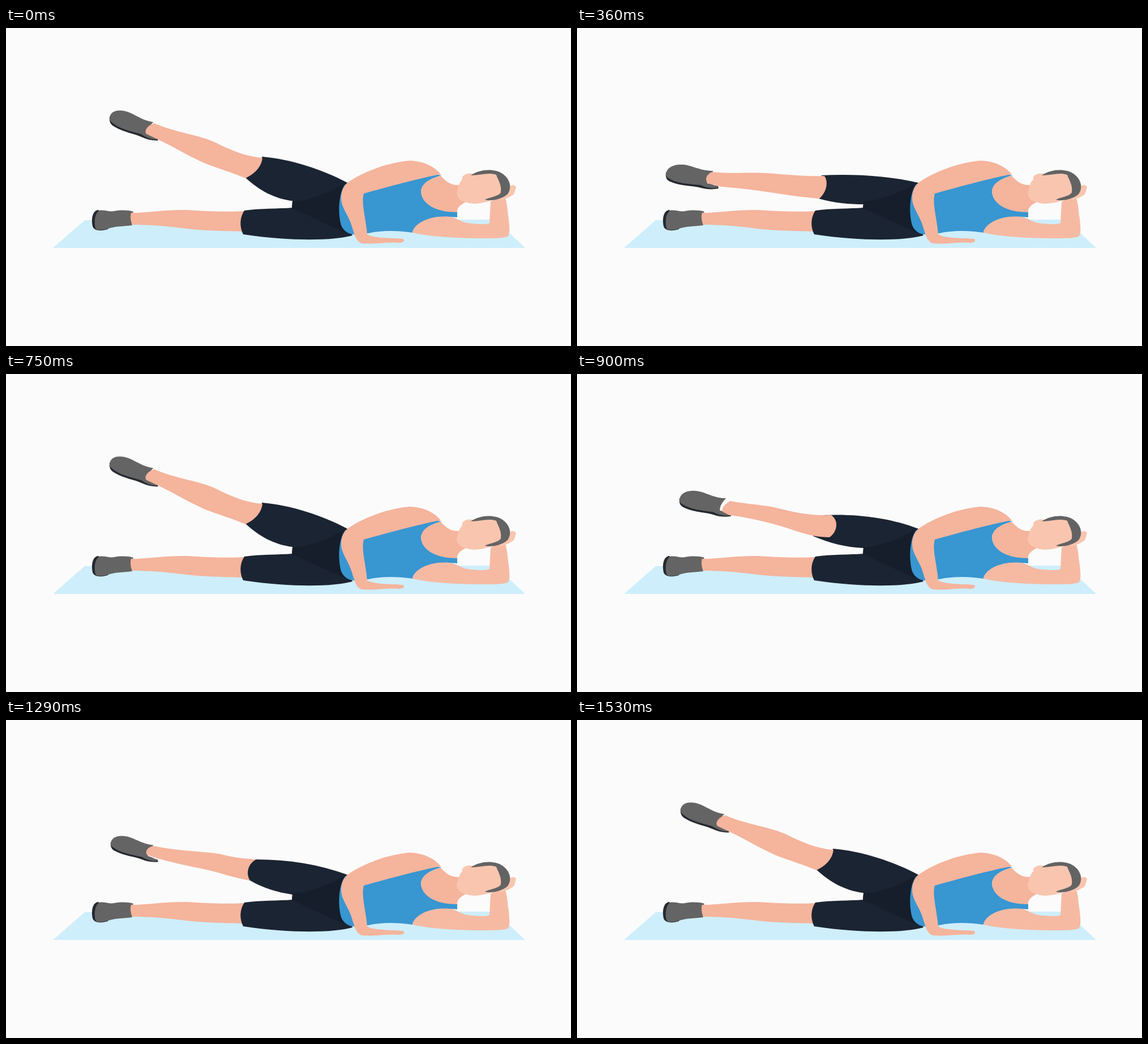
Write an HTML page with a canvas that moves like this. It is 998 by 561 pixels and loops after 1560 ms.

```html
<!DOCTYPE html>
<html lang="en">
<head>
<meta charset="utf-8">
<title>Side-lying leg raise</title>
<style>
  html, body { margin: 0; width: 100%; height: 100%; overflow: hidden; background: #fbfbfb; }
  canvas { display: block; }
</style>
</head>
<body>
<canvas id="stage" width="998" height="561"></canvas>
<script>
const ctx = document.getElementById('stage').getContext('2d');
const LOOP = 1560;

const color = {
  paper: '#fbfbfb', mat: '#ceeefb', skin: '#f5b49c', arm: '#f6baa3', face: '#f9c5af',
  shorts: '#1b2432', overlap: '#151e2a', shirt: '#3896d1', shoe: '#646464',
  sole: '#252930', hair: '#636363'
};

function fill(path, style) {
  ctx.fillStyle = style;
  ctx.fill(path);
}

const shape = d => new Path2D(d);

const mat = shape('M83 388 L139 339 L864 338 L917 388 Z');

const lowerLeg = {
  sole: shape('M163 321 C153 322 150 336 153 350 C156 359 170 358 180 355 L184 340 Z'),
  shoe: shape('M164 322 C174 320 183 325 191 323 C203 321 215 321 225 324 C220 333 221 341 223 348 C206 350 191 350 180 354 C170 357 160 358 158 353 C155 341 157 328 164 322 Z'),
  skin: shape('M221 326 C250 326 285 320 320 321 C350 323 385 325 420 323 L418 359 C380 358 340 357 310 353 C280 349 250 347 223 347 C220 340 219 332 221 326 Z'),
  shorts: shape('M421 322 C450 318 480 319 506 317 L560 308 L592 330 L612 366 C580 375 505 377 419 364 C412 350 413 334 421 322 Z')
};

const torso = {
  overlap: shape('M506 306 C538 304 568 292 595 276 C585 302 588 336 612 364 C572 352 540 332 505 318 Z'),
  shirt: shape('M599 276 C587 292 586 326 592 348 C597 360 608 366 622 364 L640 362 C670 356 692 358 718 361 C720 345 750 331 797 334 L797 324 C757 325 734 309 733 288 C735 272 752 265 769 260 L690 245 Z'),
  neck: shape('M764 256 C774 269 785 278 800 277 L812 307 C802 312 796 318 797 325 C757 325 734 309 733 288 C735 272 750 266 769 260 Z'),
  restingArm: shape('M718 361 C721 344 749 330 784 333 C800 336 802 343 822 345 C838 346 849 347 854 344 L856 306 L879 294 C886 306 885 319 888 337 C889 350 891 360 887 367 C880 372 850 371 826 371 C785 370 750 368 718 361 Z'),
  hand: shape('M876 276 L889 280 C894 275 900 277 901 281 C899 286 899 292 895 295 C888 298 884 302 873 304 Z'),
  face: shape('M823 257 C813 255 804 261 806 267 C799 274 799 283 796 290 C796 297 800 304 811 307 C824 312 839 310 855 305 L878 290 L872 256 Z'),
  hair: shape('M821 260 C836 249 862 247 877 257 C891 267 894 282 886 293 C876 302 858 306 846 303 C855 298 871 297 874 290 C876 277 869 268 866 259 C852 254 838 260 821 260 Z'),
  supportArm: shape('M603 273 C633 252 677 237 712 234 C741 235 758 246 768 258 C734 264 675 280 632 292 C627 309 636 337 638 364 C649 371 675 370 701 372 C706 375 702 379 694 379 C674 377 650 382 629 380 C617 377 615 361 609 344 C604 330 592 315 592 301 C592 289 595 280 603 273 Z')
};

// The raised shoe, drawn from its toe at the origin.
const shoe = shape('M0 1 C1 -11 14 -17 30 -16 C47 -15 59 -5 84 -5 C77 2 72 10 73 17 C80 18 88 21 92 24 C84 27 71 25 61 20 C41 18 18 17 5 8 C1 6 0 4 0 1 Z');
const shoeSole = shape('M0 -2 C-1 7 1 12 10 15 C27 22 49 21 62 25 C72 28 84 28 93 26 L92 22 L60 16 L8 2 Z');

const pose = (shoeAt, skin, shorts, hidesKnee) =>
  ({ shoeAt, skin: shape(skin), shorts: shape(shorts), hidesKnee });

const hip = 'L505 318 L590 345 C587 318 588 295 603 273 ';

const high = pose([.92, .155, 0, 1, 183, 158],
  'M262 168 C300 185 340 188 370 202 C400 217 425 227 453 229 C451 246 439 257 423 265 C400 255 375 248 352 239 C320 225 290 206 267 196 L248 187 C243 181 251 171 262 168 Z',
  'M423 264 C448 287 474 301 506 305 ' + hip + 'C560 250 503 231 452 227 C450 246 439 257 423 264 Z');

const midDown = pose([.98, .04, 0, 1, 181, 221],
  'M270 224 C300 230 330 230 360 238 C392 246 418 250 449 249 C463 258 460 279 446 288 C425 288 409 284 390 278 C350 264 309 254 269 249 L257 243 C255 235 262 230 270 224 Z',
  'M417 286 C446 298 475 306 506 307 ' + hip + 'C555 254 493 246 435 249 Z');

const low = pose([1, 0, 0, 1, 157, 257],
  'M239 254 C277 258 319 253 360 258 C389 260 412 262 437 261 C445 272 440 291 428 301 C379 297 341 289 305 285 C281 282 262 281 249 279 L230 273 C225 264 231 257 239 254 Z',
  'M427 301 C456 309 481 311 506 311 ' + hip + 'C552 261 490 257 431 260 C446 267 440 290 427 301 Z');

const midUp = pose([.9, .1, 0, .92, 185, 217],
  'M260 222 C300 231 340 231 376 236 C399 242 420 245 444 246 L434 284 C404 279 374 268 345 262 C318 257 289 250 267 244 L249 238 C245 231 250 225 260 222 Z',
  'M431 283 C455 297 480 304 506 308 ' + hip + 'C554 255 500 246 442 246 C428 253 423 270 431 283 Z', true);

// Each pose is held until its end time, then switches at once.
const holds = [
  [150, high], [330, midDown], [540, low], [750, midUp],
  [900, high], [1080, midDown], [1290, low], [1530, midUp], [LOOP, high]
];

function drawRaisedLeg(p) {
  const layers = [[p.shorts, color.shorts], [p.skin, color.skin]];
  if (p.hidesKnee) layers.reverse();
  ctx.save();
  ctx.transform(...p.shoeAt);
  fill(shoeSole, color.sole);
  fill(shoe, color.shoe);
  ctx.restore();
  for (const [path, style] of layers) fill(path, style);
}

function draw(time) {
  ctx.fillStyle = color.paper;
  ctx.fillRect(0, 0, 998, 561);
  fill(mat, color.mat);

  fill(lowerLeg.sole, color.sole);
  fill(lowerLeg.shoe, color.shoe);
  fill(lowerLeg.skin, color.skin);
  drawRaisedLeg(holds.find(([end]) => time < end)[1]);
  fill(lowerLeg.shorts, color.shorts);
  fill(torso.overlap, color.overlap);

  fill(torso.shirt, color.shirt);
  fill(torso.neck, color.skin);
  fill(torso.restingArm, color.arm);
  fill(torso.hand, color.face);
  fill(torso.face, color.face);
  fill(torso.hair, color.hair);
  fill(torso.supportArm, color.skin);
}

const start = performance.now();

function tick() {
  draw((performance.now() - start) % LOOP);
  requestAnimationFrame(tick);
}
tick();
</script>
</body>
</html>
```
